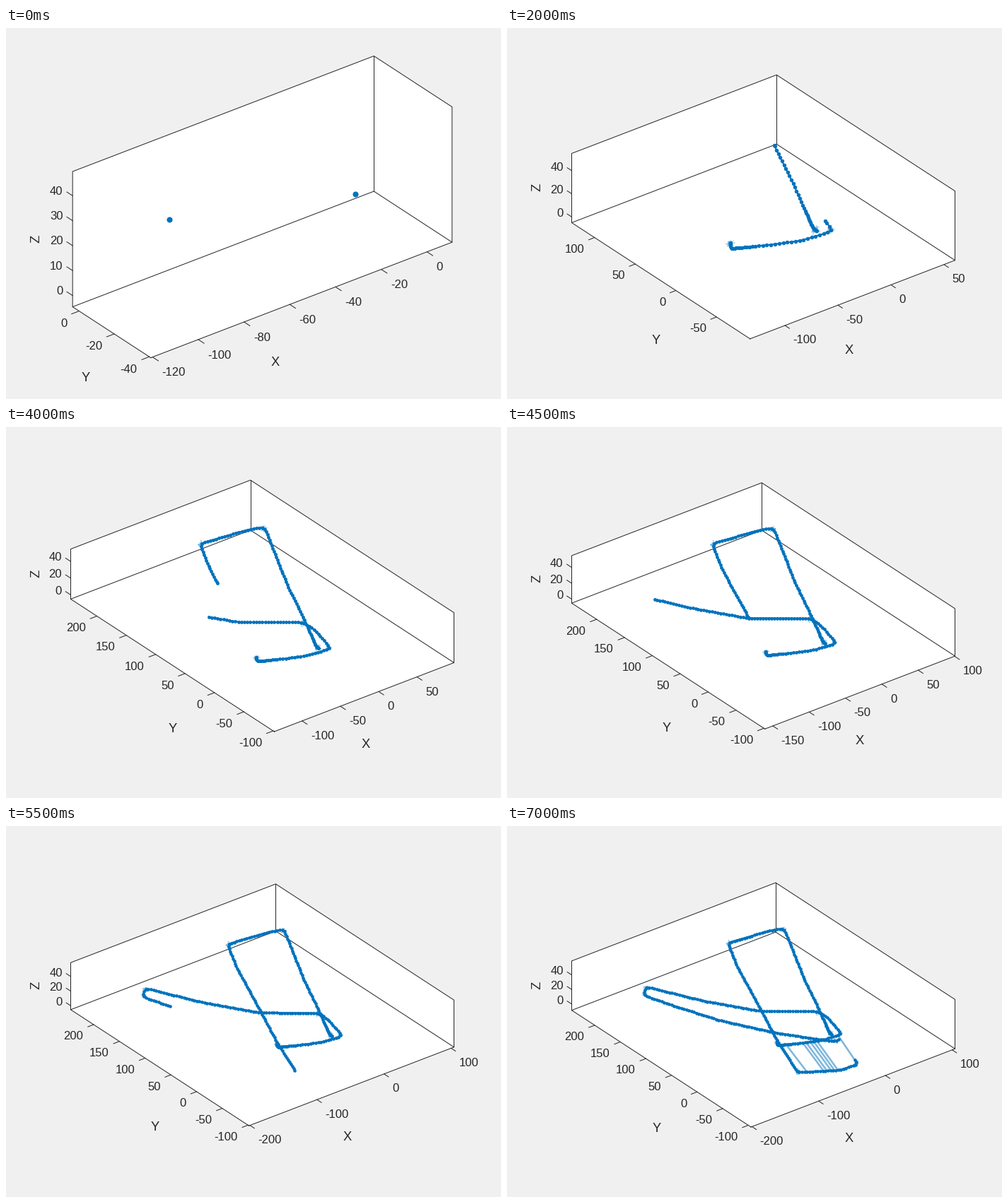
A matplotlib script that plays this animation: 700x525 px, repeating every 7500 ms.

```python
import numpy as np
import matplotlib.pyplot as plt
from matplotlib.animation import FuncAnimation

W, H, DPI = 700, 525, 100
BLUE, INK, GREY = "#0072BD", "#262626", "#f0f0f0"
FONT = "Liberation Sans"
CENTRE, ROOM = np.array([362.0, 252.6]), np.array([542.0, 427.0])

# Orthographic view, azimuth -37.5, elevation 30: world to screen right/down
AZ, EL = np.radians(-37.5), np.radians(30)
VIEW = np.array([
    [np.cos(AZ), np.sin(AZ), 0],
    [np.sin(EL) * np.sin(AZ), -np.sin(EL) * np.cos(AZ), -np.cos(EL)],
])
UNVIEW = np.linalg.inv(np.vstack([VIEW, [0, 0, 1]]))

STEPS = 15
STOP_STEPS = (0, 2, 4, 6, 7, 9, 11, 14)


class Path:
    """Rounded route through (right, up, height) corners, walked by length."""

    CUT = 5

    def __init__(self, corners, stops):
        pts = np.array(corners, float)
        t = np.linspace(0, 1, 9)[:, None]
        route, bends = [pts[:1]], []
        for a, b, c in zip(pts, pts[1:], pts[2:]):
            back, ahead = a - b, c - b
            la, lc = np.hypot(*back[:2]), np.hypot(*ahead[:2])
            cut = min(self.CUT, la / 2, lc / 2)
            p, q = b + back * cut / la, b + ahead * cut / lc
            route.append((1 - t) ** 2 * p + 2 * t * (1 - t) * b + t ** 2 * q)
            if -back[:2] @ ahead[:2] < la * lc * np.cos(np.radians(30)):
                bends.append(sum(map(len, route)) - 5)
        self.pts = np.vstack(route + [pts[-1:]])
        self.arc = np.r_[0, np.cumsum(np.hypot(*np.diff(self.pts[:, :2], axis=0).T))]
        self.ends = np.minimum(np.interp(range(STEPS), STOP_STEPS, stops), self.arc[-1])
        self.bends = [1.0] + [s for s in self.arc[bends] if s > 10]

        # poses start dense and spread out as the vehicle picks up speed
        poses, s = [], 0.0
        while s < self.arc[-1]:
            poses.append(s)
            s += min(3.1, 0.6 + 0.09 * s)
        self.poses = np.array(poses)

    def at(self, s):
        """World positions at route lengths s."""
        r, u, h = (np.interp(s, self.arc, col) for col in self.pts.T)
        return np.stack([r, -u, h], -1) @ UNVIEW.T

    def until(self, i):
        end = self.ends[i]
        return self.at(np.r_[self.poses[self.poses < end], end])


first = Path(
    [(0, 0, 0), (-2.5, 1.5, 0), (-17.8, 35.7, 4), (-31.9, 64, 7.7),
     (-56.5, 126, 26.5), (-72.4, 123.4, 26.8), (-123.5, 108.5, 22),
     (-112, 80.2, 20), (-83, 27, 21), (-64.8, -7.5, 21), (-40.5, -45.5, 21),
     (9, -43, 0), (30.5, -36, -2.9), (28.2, -30.7, -2.9)],
    (0, 6.8, 71.7, 153.3, 203, 295.5, 374, 460))
second = Path(
    [(-64.5, -9, 45.2), (-64.5, -13.4, 48), (-34, -10.4, 49.5),
     (-12, -7.4, 50), (12.5, 0, 47), (-4.5, 19.5, 46), (-16, 27, 45),
     (-84, 27.3, 44), (-152, 39.5, 44), (-220.5, 56.5, 51),
     (-224, 46.5, 54), (-190, 34.5, 51), (-133.8, 16.6, 48),
     (-67, 1.7, 45), (-17, -6, 42), (5, -8.5, 40), (8.3, -6.6, 40)],
    (0, 34, 88.6, 114, 143, 290, 367.5, 580))

# Links join the second route at s with the first route at s + LINK_GAP
LINK_GAP = 376
LINKS = (14, 34, 38, 43, 47, 51, 77)


def burst(rng, radius=2.6, n=22):
    """Short random strokes scattered round a point, in view units."""
    mid = rng.normal(0, radius * 0.45, (n, 2))
    turn = rng.uniform(0, np.pi, n)
    half = np.c_[np.cos(turn), np.sin(turn)] * rng.uniform(0.25, 0.6, (n, 1)) * radius
    gap = np.full_like(mid, np.nan)
    return np.stack([mid - half, mid + half, gap], 1).reshape(-1, 2)


RNG = np.random.default_rng(4)
BURSTS = [(path, s, burst(RNG)) for path in (first, second) for s in path.bends]

fig = plt.figure(figsize=(W / DPI, H / DPI), dpi=DPI, facecolor=GREY)
ax = fig.add_axes([0, 0, 1, 1])


def px(n):
    return n * 72 / DPI


def stroke(points, color=INK, width=1, **kw):
    ax.plot(*np.asarray(points).T, color=color, lw=px(width), **kw)


def write(x, y, s, size=16.67, **kw):
    ax.text(x, y, s, color=INK, family=FONT, fontsize=px(size), **kw)


def ticks(lo, hi, unit, room, steps=(10, 20, 50, 100)):
    """Multiples of the smallest step at least `room` pixels apart."""
    step = next(n for n in steps if n * unit >= room)
    return range(int(np.ceil(lo / step)) * step, int(hi // step) * step + 1, step)


def draw_axes(lim, scale, place):
    (x0, x1), (y0, y1), (z0, z1) = lim
    front, left, right = place((x0, y0, z0)), place((x0, y1, z0)), place((x1, y0, z0))
    back, apex = place((x1, y1, z0)), place((x1, y1, z1))
    left_top, right_top = place((x0, y1, z1)), place((x1, y0, z1))
    outline = np.array([front, left, left_top, apex, right_top, right, front])
    ax.fill(*outline.T, color="white", lw=0)
    stroke(outline)
    for corner in (left, apex, right):
        stroke([back, corner])

    tick = 0.025 * np.ptp(lim, axis=1).max() * scale
    ex, ey = VIEW[:, 0] * tick, VIEW[:, 1] * tick
    ux, uy = scale * np.abs(VIEW[0, :2])

    def mark(p, out, dx, dy, value, align):
        stroke([p, p + out])
        write(*(p + out + (dx, dy)), str(value), ha=align)

    for v in ticks(x0, x1, ux, 50):
        mark(place((v, y0, z0)), -ey, 5, 21.4, v, "left")
    for v in ticks(y0, y1, uy, 34):
        mark(place((x0, v, z0)), -ex, -6.3, 18.2, v, "right")
    for v in ticks(z0, z1, scale, 36 if scale > 3.6 else 0, (10,) if scale > 3.6 else (20,)):
        mark(place((x0, y1, v)), ey, -5.5, 3.8, v, "right")

    # axis names sit further out the longer their edge is
    wide, deep = right[0] - front[0], front[0] - left[0]
    x, y = (front + right) / 2
    write(x + 61 - 0.229 * wide, y + 41 + 0.1216 * wide, "X", 18.33, ha="center")
    x, y = (front + left) / 2
    write(x - 60.5 + 0.213 * deep, y + 53.5 + 0.142 * deep, "Y", 18.33, ha="center")
    write(42.5, (left[1] + left_top[1]) / 2 - 1, "Z", 18.33,
          ha="center", va="center", rotation=90)


def draw(i):
    ax.clear()
    ax.set(xlim=(-0.5, W - 0.5), ylim=(H - 0.5, -0.5))
    ax.axis("off")

    # limits hug the data with a tenth of its range on either side
    routes = [path.until(i) for path in (first, second)]
    data = np.vstack(routes)
    lo, hi = data.min(axis=0), data.max(axis=0)
    pad = 0.1 * (hi - lo)
    lim = np.c_[lo - pad, hi + pad]
    scale = (ROOM / (np.abs(VIEW) @ np.ptp(lim, axis=1))).min()
    origin = CENTRE - scale * VIEW @ lim.mean(axis=1)

    def place(xyz):
        return origin + scale * (np.asarray(xyz) @ VIEW.T)

    draw_axes(lim, scale, place)

    for path, s, spikes in BURSTS:
        if path.ends[i] > s:
            stroke(place(path.at(s)) + scale * spikes, BLUE, 0.9, alpha=0.55)
    for s in LINKS:
        if first.ends[i] >= s + LINK_GAP:
            ends = [second.at(s), first.at(s + LINK_GAP)]
            stroke(place(ends), BLUE, 2.6, alpha=0.5, solid_capstyle="butt")

    for route in routes:
        pts = place(route)
        stroke(pts, BLUE, max(1, 3.4 - 0.65 * scale))
        ax.plot(*pts.T, "o", color=BLUE, ms=px(3.2 + 1.2 * scale), mew=0)
    return []


anim = FuncAnimation(fig, draw, frames=STEPS, interval=500,
                     init_func=lambda: [], repeat=True, repeat_delay=0)
plt.show()
```
